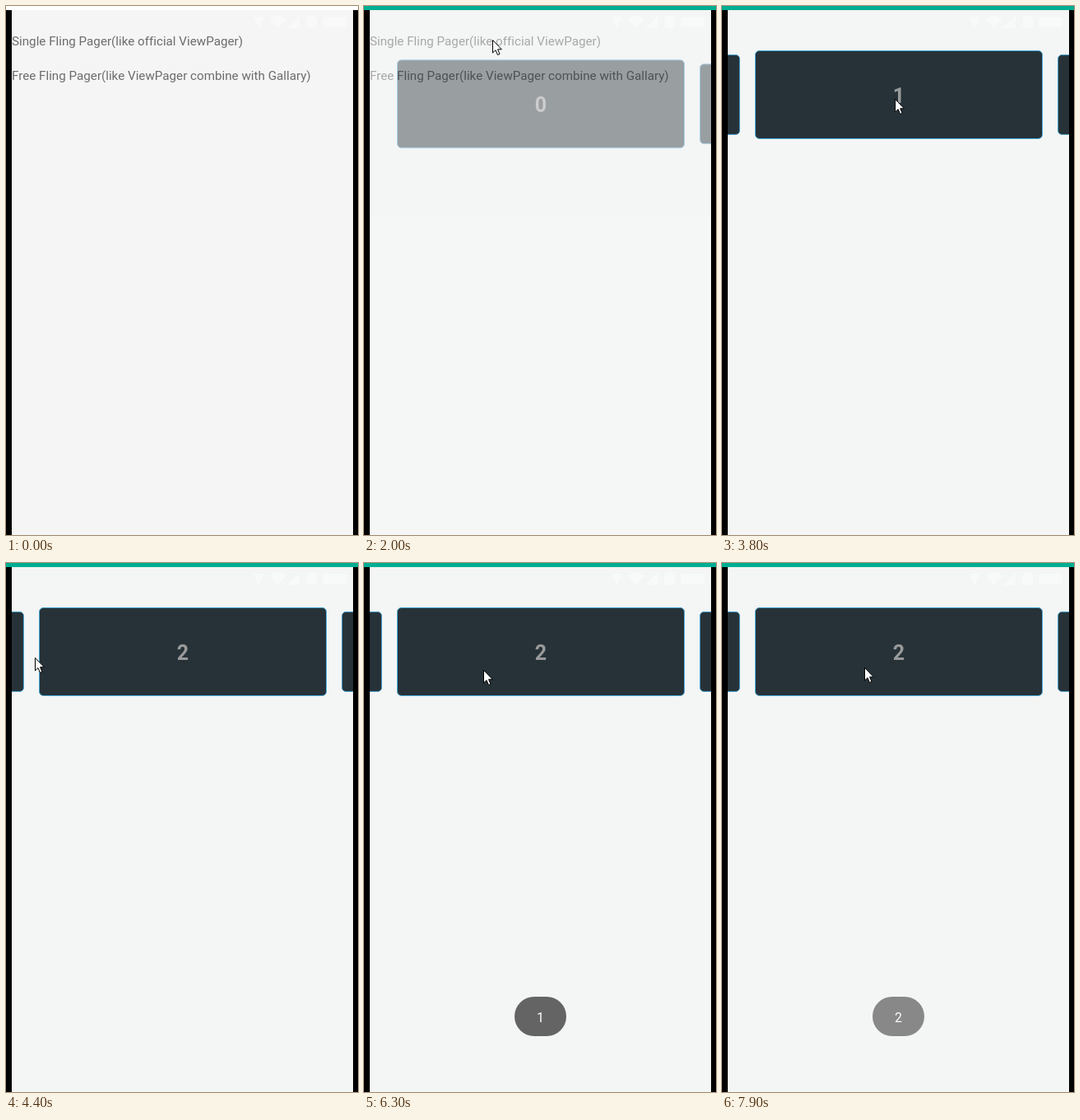
Animation of 428 by 644 pixels, one loop 8 s. Source, as an HTML page:

```html
<!DOCTYPE html>
<html lang="en">
<head>
<meta charset="utf-8">
<title>Pager demo</title>
<style>
  html, body { margin: 0; width: 100%; height: 100%; overflow: hidden; background: #000; }
  svg { display: block; width: 428px; height: 644px; font-family: Roboto, sans-serif; }
  .item { font-size: 15.2px; fill: #6c6c6c; font-variant-ligatures: none; }
  .card rect { fill: #263238; stroke: #42a5d4; stroke-width: 1; }
  .card text { font-size: 25px; font-weight: 700; fill: #9a9a9a; text-anchor: middle; }
  #toast text { font-size: 16px; fill: #fff; text-anchor: middle; }
</style>
</head>
<body>
<svg viewBox="0 0 428 644">
  <defs>
    <clipPath id="screen"><rect x="7" y="5" width="415" height="639"/></clipPath>
  </defs>
  <rect width="428" height="644"/>
  <g clip-path="url(#screen)">
    <rect x="7" y="5" width="415" height="639" fill="#f5f5f5"/>
    <text class="item" x="7" y="48">Single Fling Pager(like official ViewPager)</text>
    <text class="item" x="7" y="90">Free Fling Pager(like ViewPager combine with Gallary)</text>
    <g id="pager">
      <rect x="7" y="5" width="415" height="639" fill="#f4f5f5"/>
      <g id="cards"></g>
    </g>
    <g fill="#fff" opacity=".4">
      <path d="M301 13H314L307.5 27Z"/>
      <path d="M320 15Q330.5 8 341 15L330.5 27Z"/>
      <path d="M357 12V27H342Z"/>
      <rect x="365" y="12" width="13" height="15" rx="5"/>
      <rect x="385" y="13" width="29" height="13" rx="3"/>
    </g>
    <g id="toast">
      <rect x="183" y="528" width="63" height="48" rx="24" fill="#646464"/>
      <text x="214.5" y="558.5"></text>
    </g>
  </g>
  <rect id="bar" width="428" height="5"/>
  <path id="cursor" d="M.5 .5V16L4 12.7L6.5 18.5L9 17.5L6.6 11.8H11.3Z"
        fill="#fff" stroke="#000" stroke-linejoin="round"/>
</svg>
<script>
const LOOP = 8000, STEP = 100;
const CENTER = { x: 215, y: 108 }, PAGE_WIDTH = 351.5, SIDE_SCALE = 0.905;
const $ = id => document.getElementById(id);
const toastText = document.querySelector('#toast text');

const cursorStart = { x: 387, y: 62 };
const cursorStops = [
  { at: 900, x: 165, y: 47 },
  { at: 1300, x: 156, y: 41 },   // tap the first item
  { at: 2600, x: 226, y: 93 },
  { at: 3300, x: 105, y: 115 },  // first drag
  { at: 3800, x: 210.5, y: 113 },
  { at: 4400, x: 35, y: 115 },   // second drag
  { at: 4800, x: 12, y: 110 },   // tap the left card
  { at: 6300, x: 145, y: 130 },
  { at: 6650, x: 173, y: 127 }   // tap the middle card
];

const progress = (t, start, length) => Math.max(0, Math.min(1, (t - start) / length));
const easeOut = p => 1 - (1 - p) ** 2;
const smooth = p => p * p * (3 - 2 * p);

// Longer moves take longer; each one ends at its stop's time.
function cursorAt(t) {
  let { x, y } = cursorStart, from = cursorStart;
  for (const stop of cursorStops) {
    const duration = 300 + 1.8 * Math.hypot(stop.x - from.x, stop.y - from.y);
    const p = smooth(progress(t, stop.at - duration, duration));
    x += (stop.x - x) * p;
    y += (stop.y - y) * p;
    from = stop;
  }
  return { x, y };
}

const fling = (t, start) => smooth(progress(t, start, 600));

$('cards').innerHTML = [0, 1, 2, 3].map(n => `<g class="card">
  <rect x="-174.5" y="-53.5" width="349" height="107" rx="5"/>
  <text y="10">${n}</text></g>`).join('');
const cards = [...document.querySelectorAll('.card')];

function draw(t) {
  $('bar').setAttribute('fill', t < 1600 ? '#fff' : '#00ae93');

  const enter = easeOut(progress(t, 1900, 400));
  $('pager').setAttribute('opacity', enter);
  $('cards').setAttribute('transform', `translate(0 ${20 * (1 - enter)})`);

  const page = fling(t, 2900) + fling(t, 3800);
  cards.forEach((card, i) => {
    const offset = i - page;
    const scale = 1 - (1 - SIDE_SCALE) * Math.min(1, Math.abs(offset));
    card.setAttribute('transform',
      `translate(${CENTER.x + offset * PAGE_WIDTH} ${CENTER.y}) scale(${scale})`);
  });

  const first = progress(t, 5200, 400) - progress(t, 7000, 400);
  const second = progress(t, 7600, 400);
  $('toast').setAttribute('opacity', first + second);
  toastText.textContent = t < 7500 ? 1 : 2;

  const { x, y } = cursorAt(t);
  $('cursor').setAttribute('transform', `translate(${x} ${y})`);
  $('cursor').setAttribute('visibility', t < 100 ? 'hidden' : 'visible');
}

const begin = performance.now();
function tick() {
  const t = (performance.now() - begin) % LOOP;
  draw(Math.floor(t / STEP) * STEP);
  requestAnimationFrame(tick);
}
tick();
</script>
</body>
</html>
```
